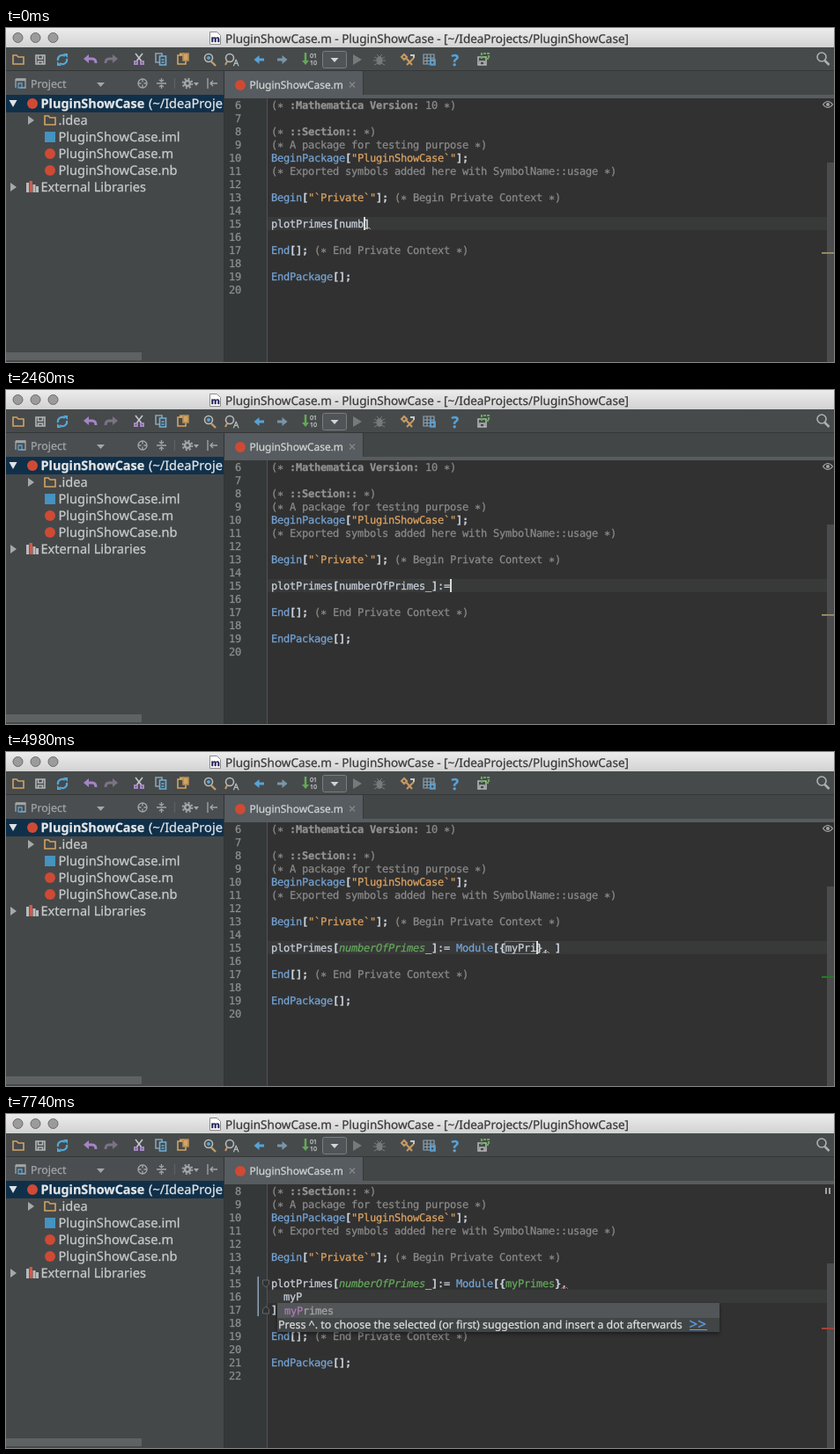
An HTML page that plays this animation: 940x380 px, repeating every 8 s.

```html
<!DOCTYPE html>
<html lang="en">
<head>
<meta charset="utf-8">
<title>Editor typing</title>
<style>
  html, body { margin: 0; width: 100%; height: 100%; overflow: hidden; background: #313131; }
  svg { display: block; width: 940px; height: 380px; text-rendering: geometricPrecision; }
  text { white-space: pre; font-family: "Noto Sans", "Open Sans", sans-serif; color: #c8cacb; }
  text, tspan { fill: currentColor; stroke: currentColor; stroke-width: .25px; }
  .tree { font-size: 14.6px; }
  .m { font: 12px "DejaVu Sans Mono", "Liberation Mono", monospace; color: #c8d0da; }
  .num { color: #8d8f90; }
  .k { color: #74a3d4; }
  .c { color: #8a8a8a; }
  .h { color: #939393; font-weight: bold; }
  .s { color: #dba262; }
  .b { font-weight: bold; }
  .i { color: #65a95c; font-style: italic; }
  .g { color: #65a95c; }
  .v { color: #8b9d68; }
  .p { color: #b07ab4; }
  .d { color: #a5a5a5; }
</style>
</head>
<body>
<svg viewBox="0 0 940 380" xmlns="http://www.w3.org/2000/svg">
  <defs>
    <linearGradient id="bar" x2="0" y2="1"><stop stop-color="#ececec"/><stop offset="1" stop-color="#d2d2d2"/></linearGradient>
    <clipPath id="ed"><rect x="248" y="80" width="692" height="300"/></clipPath>
    <clipPath id="side"><rect y="49" width="247" height="331"/></clipPath>
    <filter id="soft" x="-5%" y="-20%" width="110%" height="150%"><feDropShadow dx="0" dy="2" stdDeviation="2" flood-opacity=".45"/></filter>
  </defs>

  <!-- title bar -->
  <rect width="940" height="22" fill="url(#bar)"/>
  <g fill="#9b9b9b" stroke="#6c6c6c"><circle cx="13.500" cy="11" r="5.500"/><circle cx="33.500" cy="11" r="5.500"/><circle cx="53.500" cy="11" r="5.500"/></g>
  <path d="M231.500 4.500h8l4 4v10h-12z" fill="#fff" stroke="#8b8b8b"/>
  <text x="232.500" y="16" style="font:bold 10px 'DejaVu Sans',sans-serif;color:#26265c">m</text>
  <text x="249" y="16.500" font-size="13.5" style="color:#3a3a3a">PluginShowCase.m - PluginShowCase - [~/IdeaProjects/PluginShowCase]</text>

  <!-- toolbar -->
  <rect y="22" width="940" height="27" fill="#464a4b"/>
  <g fill="none" stroke-width="1.6">
    <path d="M8 41V31h4l2 2h6v8z" stroke="#d2a463"/>
    <path d="M34 31h10v10h-10zM36.500 31v4h5v-4M36.500 41v-3h5v3" stroke="#b3b5b6"/>
    <path d="M59 37a5 5 0 0 1 8-5M69 35a5 5 0 0 1-8 5" stroke="#55a7d6" stroke-width="2.2"/>
    <path d="M65 29h5v5zM63 43h-5v-5z" fill="#55a7d6"/>
    <path d="M92 35h6q4 0 4 5" stroke="#a585c5" stroke-width="3"/><path d="M88 35l6-5v10z" fill="#a585c5"/>
    <path d="M123 35h-6q-4 0-4 5" stroke="#7c7285" stroke-width="3"/><path d="M127 35l-6-5v10z" fill="#7c7285"/>
    <path d="M147 29l7 9M155 29l-7 9" stroke="#c4c6c7"/>
    <path d="M146 38h3v3h-3zM153 38h3v3h-3z" stroke="#a585c5" stroke-width="2"/>
    <path d="M170 29h7v10h-7z" stroke="#8ba3b3"/><path d="M174.500 32h7v10h-7z" fill="#464a4b" stroke="#6fb0d6"/><path d="M176.500 36h3M176.500 39h3" stroke="#6fb0d6"/>
    <path d="M195 31h9v10h-9z" stroke="#d2a463"/><path d="M197 30h5" stroke="#d2a463" stroke-width="3"/><path d="M201 29h6v8h-6z" fill="#d2a463" stroke="#b58c54"/>
    <circle cx="230" cy="34" r="4.500" stroke="#b7babb"/><circle cx="230" cy="34" r="2" fill="#55a7d6"/><path d="M233 38l5 5" stroke="#c79a63" stroke-width="2.4"/>
    <circle cx="254" cy="34" r="4.500" stroke="#b7babb"/><path d="M251 38l-2 4" stroke="#c79a63" stroke-width="2"/>
    <path d="M293 36h-7" stroke="#58a2d8" stroke-width="3"/><path d="M281.500 36l6-5v10z" fill="#58a2d8"/>
    <path d="M308 36h7" stroke="#7b95a8" stroke-width="3"/><path d="M319.500 36l-6-5v10z" fill="#7b95a8"/>
    <path d="M340 28v10" stroke="#65a957" stroke-width="2.500"/><path d="M336 37h8l-4 5z" fill="#65a957"/>
    <rect x="359.500" y="26.500" width="27" height="19" rx="2" fill="#505456" stroke="#7b7e80" stroke-width="1"/>
    <path d="M368.500 34h9l-4.500 5z" fill="#d0d5d8"/>
    <path d="M394 30l10 6-10 6z" fill="#777a7c"/>
    <ellipse cx="424" cy="37" rx="3.500" ry="5" fill="#777a7c"/><path d="M418 33l4 2M430 33l-4 2M417 37h14M418 42l4-2M430 42l-4-2M421 30l2 2M427 30l-2 2" stroke="#777a7c" stroke-width="1"/>
    <path d="M449 33l3-3 3 3-3 3zM454 34l7 8M455 42l8-8" stroke="#c79a63" stroke-width="2"/><path d="M459 31h4v3" stroke="#c5c7c8" stroke-width="2"/>
    <path d="M474 30h12v11h-12zM474 34h12M474 37.500h12M478 30v11M482 30v11" stroke="#8ba3b3" stroke-width="1.2"/><path d="M482 36h5v6h-5z" stroke="#58a2d8"/>
    <path d="M536 33h9v9h-9zM538 42v-4h5v4" stroke="#b3b5b6"/><path d="M540 35v-6h8v6h-4" stroke="#65a957" stroke-dasharray="3 1" stroke-width="2.200"/>
    <circle cx="926" cy="33" r="5" stroke="#aeb1b2"/><path d="M929.500 37l5 5" stroke="#aeb1b2" stroke-width="2.500"/>
  </g>
  <text x="258" y="43" font-size="10">A</text>
  <text x="505.500" y="43" style="font:bold 18px 'Noto Sans',sans-serif;color:#58a2d8">?</text>
  <g font-size="7"><text x="345" y="34">01</text><text x="345" y="42">10</text></g>
  <path d="M0 48.500h940" stroke="#343637"/>

  <!-- project panel -->
  <g clip-path="url(#side)">
    <rect y="49" width="247" height="331" fill="#454849"/>
    <rect y="49" width="247" height="27" fill="#4a4e50"/>
    <g fill="none" stroke="#a3a6a7" stroke-width="1.300">
      <path d="M11 58h11v10h-6M11 58v10" /><path d="M11 59h11" stroke-width="2.500"/><path d="M14 63h4v5h-4z" stroke="#58a2d8"/>
      <circle cx="155" cy="63" r="5"/><path d="M155 58v3.500M155 64.500v3.500M150 63h3.500M156.500 63h3.500"/>
      <path d="M171 63h11M176.500 57v4M176.500 65v4M174 59l2.500 2 2.500-2M174 67l2.500-2 2.500 2"/>
      <path d="M191.500 57v12" stroke="#5d6163"/>
      <circle cx="206" cy="63" r="3" stroke-width="2.500"/><circle cx="206" cy="63" r="5.300" stroke-dasharray="2 2.160" stroke-width="2"/>
      <path d="M229 57v12M232 63h8M235 60l-3 3 3 3"/>
    </g>
    <path d="M103 62h9l-4.500 5zM213 62h6l-3 4z" fill="#a3a6a7"/>
    <text x="28" y="67.500" font-size="12.400" style="color:#a3a6a7">Project</text>
    <rect y="76" width="247" height="20" fill="#10304a"/>
    <path d="M3.500 82h9l-4.500 8z" fill="#dfe3e6"/>
    <path d="M25 100v10l7-5zM5 176v10l7-5z" fill="#a6a9aa"/>
    <g fill="#cf4a34"><circle cx="30" cy="86" r="6"/><circle cx="50" cy="143" r="6"/><circle cx="50" cy="162" r="6"/></g>
    <path d="M44 110v-10h4l2 2h6v8z" fill="none" stroke="#d2a463" stroke-width="1.600"/>
    <rect x="44" y="118" width="12" height="12" fill="#4593c0"/>
    <path d="M23 187v-11h3v11zM30.500 187v-9h3v9zM34 187v-7h3v7z" fill="#b9bcbd"/><path d="M26.500 187v-13h3.500v13z" fill="#cf5a4c"/>
    <g class="tree">
      <text x="39.500" y="91" style="font-weight:bold;font-size:14.400px;color:#e3e6e8">PluginShowCase</text>
      <text x="162" y="91" style="color:#e3e6e8">(~/IdeaProje</text>
      <text x="59.500" y="110">.idea</text>
      <text x="59.500" y="129">PluginShowCase.iml</text>
      <text x="59.500" y="148">PluginShowCase.m</text>
      <text x="59.500" y="167">PluginShowCase.nb</text>
      <text x="39.500" y="186">External Libraries</text>
    </g>
    <rect y="369" width="154" height="9" fill="#5e6263"/>
  </g>
  <rect x="247" y="49" width="1" height="331" fill="#323435"/>

  <!-- tabs and editor ground -->
  <rect x="248" y="49" width="692" height="27" fill="#424647"/>
  <rect x="248" y="49" width="157" height="27" fill="#565c5f"/>
  <path d="M405.500 49v27" stroke="#35383a"/>
  <rect x="248" y="76" width="692" height="4" fill="#565c5f"/>
  <circle cx="266" cy="65" r="6" fill="#cf4a34"/>
  <text x="276.500" y="69" font-size="11.900" style="color:#d2d5d6">PluginShowCase.m</text>
  <path d="M390 61.500l6 6M396 61.500l-6 6" stroke="#83888a" stroke-width="1.300"/>
  <rect x="248" y="80" width="692" height="300" fill="#313131"/>
  <rect x="248" y="80" width="48" height="300" fill="#353839"/>
  <path d="M296.500 80v300" stroke="#505354"/>
  <text id="probe" class="m" x="-200" y="-20">0000000000</text>
  <g id="view" clip-path="url(#ed)"></g>
</svg>
<script>
const LOOP = 8000, X0 = 301, CW = 7, LH = 15;
const view = document.getElementById('view');
const gap = CW - document.getElementById('probe').getComputedTextLength() / 10;

// last value whose start time has been reached
const at = (t, steps) => {
  let v = steps[0][1];
  for (const [from, val] of steps) if (t >= from) v = val;
  return v;
};
const col = n => X0 + n * CW;
const rect = (x, y, w, h, fill, more = '') =>
  `<rect x="${x}" y="${y}" width="${w}" height="${h}" fill="${fill}" ${more}/>`;
const span = ([s, cls = '']) => cls ? `<tspan class="${cls}">${s}</tspan>` : s;
const mono = (x, y, parts, cls = '') =>
  `<text class="m ${cls}" x="${x}" y="${y}" letter-spacing="${gap}">${parts.map(span).join('')}</text>`;
const wave = (x, y, colour) =>
  `<path d="M${x} ${y}l2-2 2 2 2-2 2 2" fill="none" stroke="${colour}"/>`;

const call = (name, arg = '') => [[name, 'k'], ['[', 'b'], [arg, 's'], ['];', 'b']];
const note = s => [[`(∗ ${s} ∗)`, 'c']];
const marked = (s, rest = '') => [['(∗ ', 'c'], [s, 'h'], [rest + ' ∗)', 'c']];
const head = [
  marked(':Mathematica Version:', ' 10'), [],
  marked('::Section::'),
  note('A package for testing purpose'),
  call('BeginPackage', '"PluginShowCase`"'),
  note('Exported symbols added here with SymbolName::usage'), [],
  [...call('Begin', '"`Private`"'), [' '], ...note('Begin Private Context')], []
];
const tail = [[], [...call('End'), [' '], ...note('End Private Context')], [], call('EndPackage'), []];

// characters typed after "plotPrimes["
const typed = [[0, 4], [60, 6], [300, 7], [360, 8], [600, 9], [660, 10], [720, 11], [780, 13],
  [1080, 14], [1380, 15], [1920, 16], [2220, 17], [2460, 18], [3000, 20], [3060, 21], [3120, 22], [3180, 23]];
const varLen = [[0, 0], [4440, 1], [4620, 2], [4860, 3], [4920, 4], [4980, 5], [5040, 6], [5100, 7], [5160, 8]];
const bodyLen = [[0, 0], [6720, 1], [6840, 2], [6960, 3]];
const eyeSteps = [[0, 1], [1680, 0], [1860, 1], [2640, 0], [2700, 1], [3180, 0], [3540, 1], [6900, 0]];
const TAN = '#958763', GREEN = '#237a27', RED = '#a5403a';
const stripes = [[0, TAN], [1140, GREEN], [2460, TAN], [3960, GREEN], [6060, RED]];
const popups = [
  [0, null],
  [1620, { x: 469, y: 230, h: 69 }], [1680, { x: 469, y: 230, h: 152 }], [1860, null],
  [3060, { x: 504, y: 230, h: 69 }], [3180, { x: 504, y: 230, h: 33, word: 'Module', hit: 4 }], [3540, null],
  [4500, { x: 560, y: 230, h: 69 }], [4680, null],
  [6720, { x: 308, y: 215, h: 84 }], [6900, { x: 308, y: 215, h: 33, word: 'myPrimes', hit: 2 }],
  [6960, { x: 308, y: 215, h: 33, word: 'myPrimes', hit: 3 }]
];

function definition(t, n, local) {
  const parts = [['plotPrimes'], ['[', 'b'], ['numberOfPrimes'.slice(0, n), t >= 2700 ? 'i' : '']];
  if (n > 14) parts.push(['_']);
  parts.push([']', 'b']);
  if (t < 3540) return [...parts, [':= Modu'.slice(0, Math.max(0, n - 16))]];
  const tint = t < 4440 ? 'v' : t >= 5460 ? 'g' : '';
  parts.push([':= '], ['Module', t >= 3900 ? 'k' : ''], ['[{', 'b'], [local, tint], ['}', 'b'], [',']);
  return t < 5880 ? [...parts, [' '], [']', 'b']] : parts;
}

function popup({ x, y, h, word, hit }) {
  let s = rect(x, y, 502, h, '#474a4b', 'filter="url(#soft)"');
  if (!word) return s;
  s += rect(x, y, 502, 17, '#525658');
  s += mono(x + 8, y + 13, [[word.slice(0, hit), 'p'], [word.slice(hit), 'd']]);
  s += rect(x, y + 17, 502, h - 17, '#414546');
  s += `<text x="${x + 1}" y="${y + 29}" font-size="12.45" style="color:#dcdedf">Press ^. to choose the selected (or first) suggestion and insert a dot afterwards</text>`;
  s += `<text x="${x + 467.5}" y="${y + 29.5}" font-size="17" style="color:#5f9fe8">&gt;&gt;</text>`;
  return s + rect(x + 468, y + 30, 20, 1, '#5f9fe8');
}

const fold = (y, dir) =>
  `<path d="M291.500 ${y - 4 * dir}h7v${5 * dir}l-3.500 ${3 * dir}l-3.500 ${-3 * dir}z" fill="#313131" stroke="#626667"/>`;

function frame(t) {
  const split = t >= 5880, n = at(t, typed), m = at(t, bodyLen);
  const local = t < 4440 ? 'vars' : 'myPrimes'.slice(0, at(t, varLen));
  const top = split ? 185 : 215;
  const caretY = split ? 200 : 215;
  const caret = col(split ? 2 + m : t >= 3540 ? 38 + local.length : 11 + n);

  let s = rect(297, caretY, 643, LH, '#383939');
  s += rect(932, split ? 170 : 153, 8, 240, '#4a4c4d');

  if (t >= 1140 && t < 1920) s += rect(col(11), top, 98, LH, '#394a40');
  if (t >= 1920 && t < 2220) s += rect(col(10), top, CW, LH, '#3f5450') + rect(col(26), top, CW, LH, '#3f5450');
  if (t >= 3540 && !split) {
    const w = local.length * CW;
    s += t < 4440 ? rect(col(38), top, w, LH, '#27518f')
      : rect(col(38) - .5, top + .5, w + 1, LH - 1, 'none', 'stroke="#66747e"');
  }

  const body = [definition(t, n, local)];
  if (split) body.push([['  ' + 'myP'.slice(0, m)]], [[']', 'b']]);
  [...head, ...body, ...tail].forEach((parts, i) => {
    const y = 92 + i * LH - (split ? 30 : 0), no = i + 6;
    if (y < 85) return;
    s += mono(no < 10 ? 260 : 253, y, [[no]], 'num');
    if (parts.length) s += mono(X0, y, parts);
  });

  if (n < 16) s += wave(caret, top + 14, '#a6a68c');
  if (t >= 3540) s += wave(col(39 + local.length), top + 14, t >= 6060 ? '#c65a4a' : '#a3a09a');

  if (t >= 6060) {
    s += rect(285.5, 185, 1.5, 45, '#8ba6bb');
    s += fold(193, 1) + fold(223, -1);
  }

  const hidden = t >= 6540 && t < 6720 || t >= 7740;
  if (!hidden) s += rect(caret, caretY, 2, LH, t >= 3540 && t < 4440 ? '#f0402c' : '#d8d8d8');

  s += rect(926, split ? 243 : 255, 14, 2, at(t, stripes));
  s += at(t, eyeSteps)
    ? '<path d="M927.500 87q5.500-7 11 0q-5.500 7-11 0z" fill="none" stroke="#a2a5a6" stroke-width="1.200"/><circle cx="933" cy="87" r="2" fill="#a2a5a6"/>'
    : rect(930, 84, 2, 7, '#a2a5a6') + rect(934, 84, 2, 7, '#a2a5a6');

  const box = at(t, popups);
  return box ? s + popup(box) : s;
}

let last = '';
function tick() {
  const s = frame(performance.now() % LOOP);
  if (s !== last) view.innerHTML = last = s;
  requestAnimationFrame(tick);
}
tick();
</script>
</body>
</html>
```
